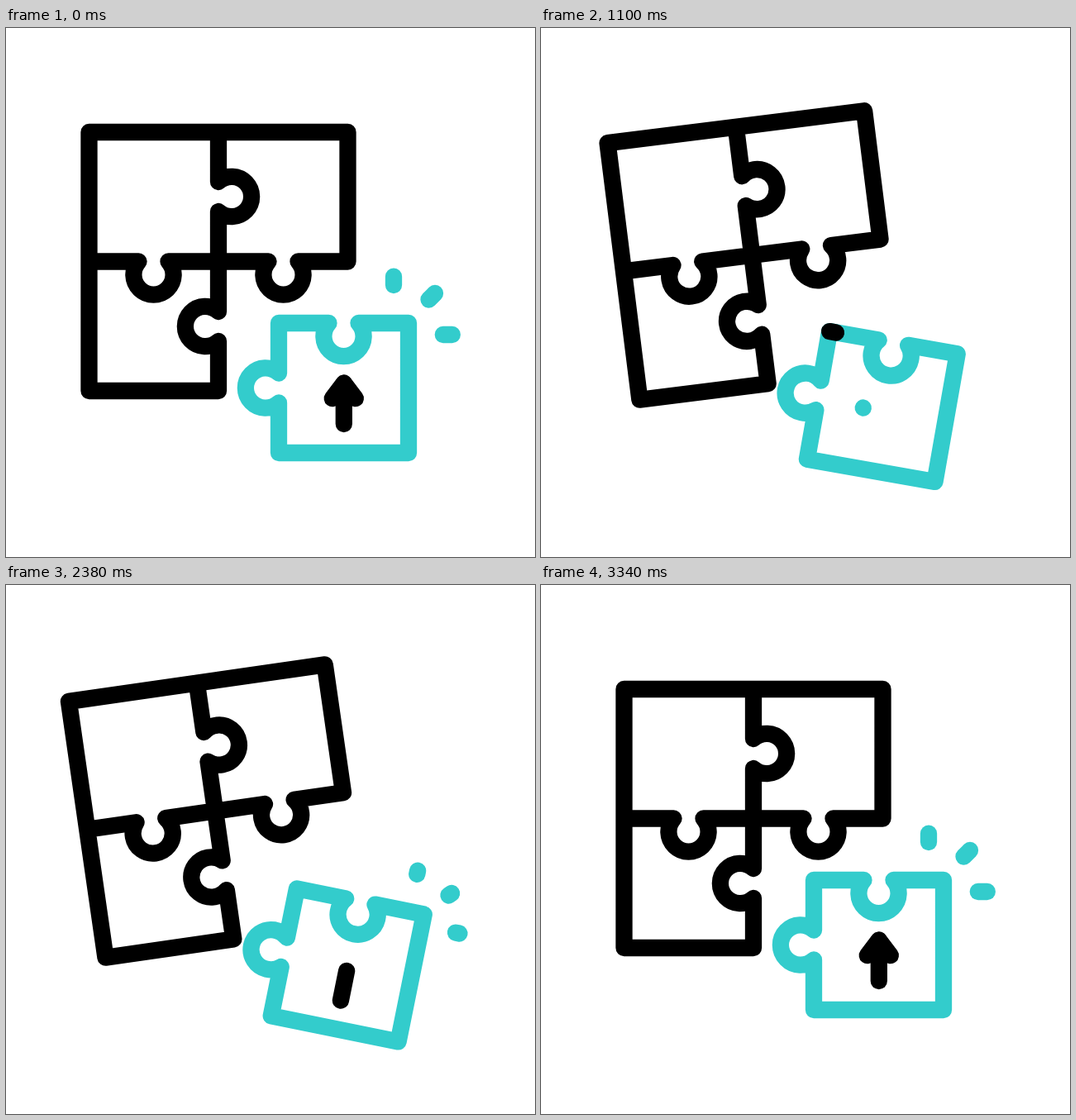
An HTML page for the animation above (3600 ms loop, 640 by 640 pixels).

```html
<!DOCTYPE html>
<html lang="en">
<head>
<meta charset="utf-8">
<title>Puzzle</title>
<style>
  html, body { margin: 0; width: 100%; height: 100%; overflow: hidden; background: #fff; }
  svg { display: block; width: 100vw; height: 100vh; }
  path { fill: none; stroke: #000; stroke-width: 20.3; stroke-linecap: round; stroke-linejoin: round; }
  .teal { stroke: #33cccc; }
</style>
</head>
<body>
<svg viewBox="0 0 640 640">
  <g id="board">
    <path d="M-156.5-156.5H156.5V0H96.5A24.1 24.1 0 1 1 60.5 0H-60.5A24.1 24.1 0 1 1-96.5 0H-156.5
      M-156.5-156.5V156.5H0V96.5A24.1 24.1 0 1 1 0 60.5V-60.5A24.1 24.1 0 1 0 0-96.5V-156.5"/>
  </g>
  <g id="piece">
    <path class="teal" d="M-78.5-78.5H-18A24.1 24.1 0 1 0 18-78.5H78.5V78.5H-78.5V18A24.1 24.1 0 1 1-78.5-18Z"/>
    <path id="outline" d="M-78.5-78.5H-18A24.1 24.1 0 1 0 18-78.5H78.5V78.5H-78.5V18A24.1 24.1 0 1 1-78.5-18Z"/>
    <path id="check" class="teal" d="M-22.5 5.5L-4.5 22.3L23.5-9.5"/>
    <g id="arrow">
      <path id="shaft" d="M.3 43.5V-5.5"/>
      <path id="head" d="M-13.7 12.7L.3-6L14.3 12.7"/>
    </g>
    <path class="teal spark" d="M60.5-124.5V-134.8"/>
    <path class="teal spark" d="M103-107L110.5-114.5"/>
    <path class="teal spark" d="M120.3-64.5H131.3"/>
  </g>
</svg>
<script>
const LOOP = 3600;
const $ = id => document.getElementById(id);
const sparks = document.querySelectorAll('.spark');

const progress = (t, [a, b]) => Math.min(1, Math.max(0, (t - a) / (b - a)));
const ease = (t, span) => { const s = progress(t, span); return s * s * (3 - 2 * s); };
const mix = (a, b, p) => a + (b - a) * p;

// Start and end of each phase, for position and for rotation
const MOVE = { lift: [0, 560], join: [560, 1460], split: [2000, 2900], settle: [2905, 3328] };
const TURN = { lift: [0, 525], join: [560, 1380], split: [1985, 2900], settle: [2890, 3328] };

const lifted = (t, { lift, settle }) => ease(t, lift) - ease(t, settle);
const joined = (t, { join, split }) =>
  t < 1730 ? progress(t, join) ** 3 : (1 - progress(t, split)) ** 3;

const board = { rest: [257, 282.5], apart: [237, 262.5], whole: [321, 320], turn: -10 };
const piece = { rest: [408.5, 435.5], apart: [416.5, 474.5], whole: [399.5, 398.5], turn: 14 };

function place(id, { rest, apart, whole, turn }, t) {
  const [x, y] = rest.map((r, i) => mix(mix(r, apart[i], lifted(t, MOVE)), whole[i], joined(t, MOVE)));
  const angle = turn * lifted(t, TURN) * (1 - joined(t, TURN));
  $(id).setAttribute('transform', `translate(${x} ${y}) rotate(${angle})`);
}

function trim(path, amount) {
  path.setAttribute('pathLength', 100);
  path.style.strokeDasharray = amount < 1 ? `${Math.max(.01, amount * 100)} 300` : 'none';
  path.style.visibility = amount > 0 ? 'visible' : 'hidden';
}

function draw(t) {
  place('board', board, t);
  place('piece', piece, t);
  trim($('outline'), ease(t, [1080, 1430]) - ease(t, [1850, 2200]));
  trim($('check'), ease(t, [1085, 1620]) - ease(t, [1655, 2195]));
  trim($('shaft'), 1 - ease(t, [800, 1085]) + ease(t, [2180, 2480]));
  trim($('head'), 1 - ease(t, [660, 880]) + ease(t, [2430, 2620]));
  for (const spark of sparks) trim(spark, 1 - ease(t, [600, 1075]) + ease(t, [2165, 2650]));
  const dip = 11 * Math.sin(Math.PI * progress(t, [0, 680])) ** 2;
  $('arrow').setAttribute('transform', `translate(0 ${dip})`);
}

function frame() {
  draw(performance.now() % LOOP);
  requestAnimationFrame(frame);
}
frame();
</script>
</body>
</html>
```
